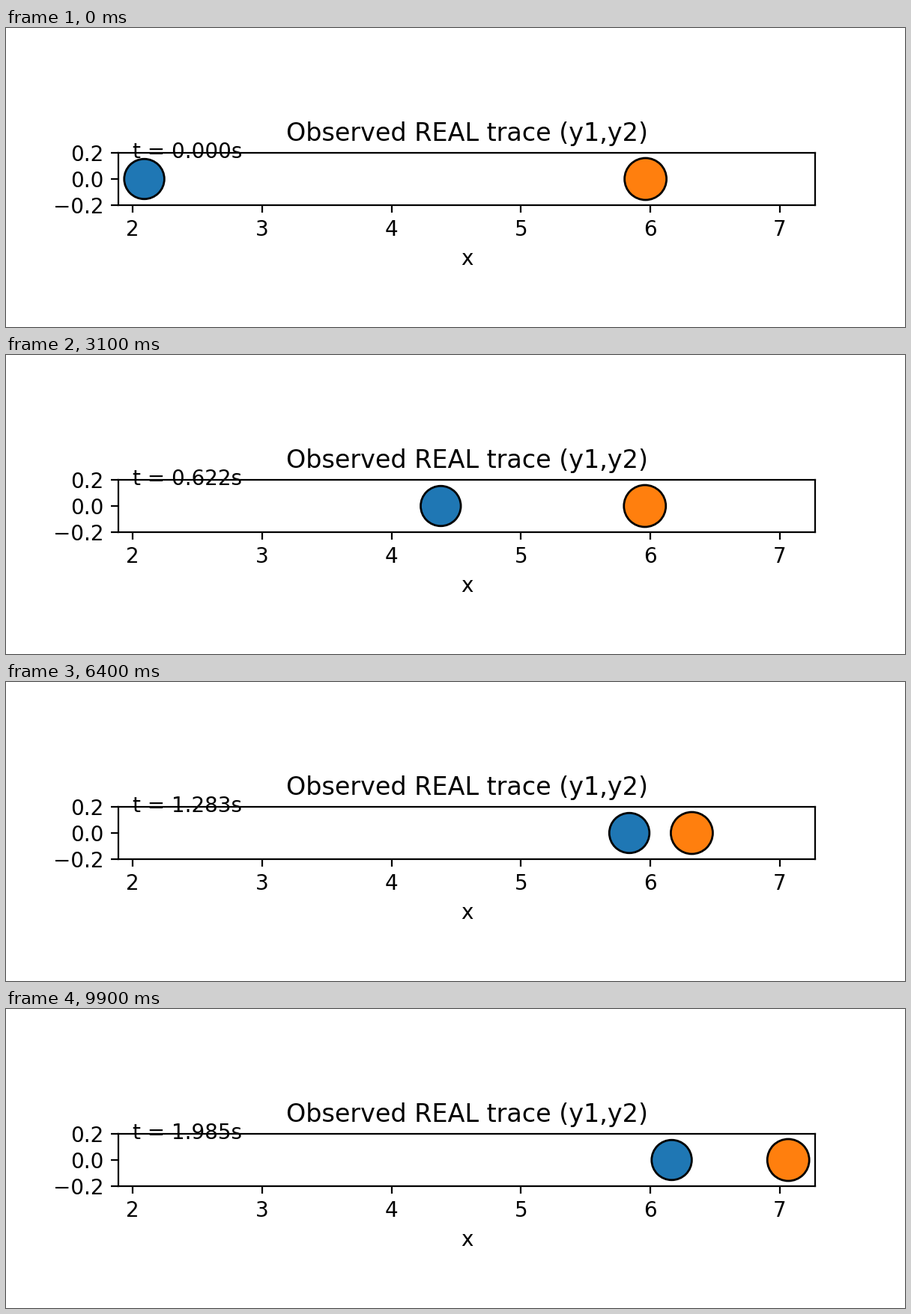
Recreate the animation shown at these times as a matplotlib script. Size 1200 by 400 pixels, loop 10000 ms.

```python
import numpy as np
import matplotlib.pyplot as plt
from matplotlib.animation import FuncAnimation
from matplotlib.patches import Circle

FRAMES = 100
INTERVAL = 100
T = np.linspace(0, 2, 400)[::4]
T_HIT = T[53]

# Sampled path of the second ball after the hit: seconds since the hit, x
HIT_T = np.array([0, 2, 11, 13, 24, 25, 35, 46]) * T[1]
HIT_X = [5.993, 6.057, 6.324, 6.375, 6.641, 6.667, 6.884, 7.063]
ROLL = np.polyfit(HIT_T, HIT_X, 3)


def ball1(t):
    """Decelerating approach, then a slower roll after the hit."""
    u = t - T_HIT
    before = 2.0897 + 4.0755 * t - 0.6284 * t**2
    after = 5.671 + 0.8215 * u - 0.311 * u**2
    return np.where(t < 0.9, before, np.minimum(before, after))


def ball2(t):
    """Near rest with a small initial drift, then pushed away."""
    rest = 5.957 + 0.005 * np.exp(-t / 0.1)
    return np.where(t < 1.0, rest, np.maximum(rest, np.polyval(ROLL, t - T_HIT)))


Y1, Y2 = ball1(T), ball2(T)

plt.rcParams["font.family"] = "DejaVu Sans"
fig, ax = plt.subplots(figsize=(6, 2), dpi=200)
ax.set_aspect("equal")
ax.set_xlim(1.8897, 7.272)
ax.set_ylim(-0.2, 0.2)
ax.set_xticks(range(2, 8))
ax.set_yticks([-0.2, 0, 0.2])
ax.set_xlabel("x")
ax.set_title("Observed REAL trace (y1,y2)")

c1 = ax.add_patch(Circle((Y1[0], 0), 0.155, fc="tab:blue", ec="black"))
c2 = ax.add_patch(Circle((Y2[0], 0), 0.162, fc="tab:orange", ec="black"))
clock = ax.text(0.02, 0.9, "", transform=ax.transAxes)


def update(i):
    c1.center = Y1[i], 0
    c2.center = Y2[i], 0
    clock.set_text(f"t = {T[i]:.3f}s")
    return c1, c2, clock


anim = FuncAnimation(fig, update, frames=FRAMES, interval=INTERVAL,
                     repeat=True, repeat_delay=0)
plt.show()
```
